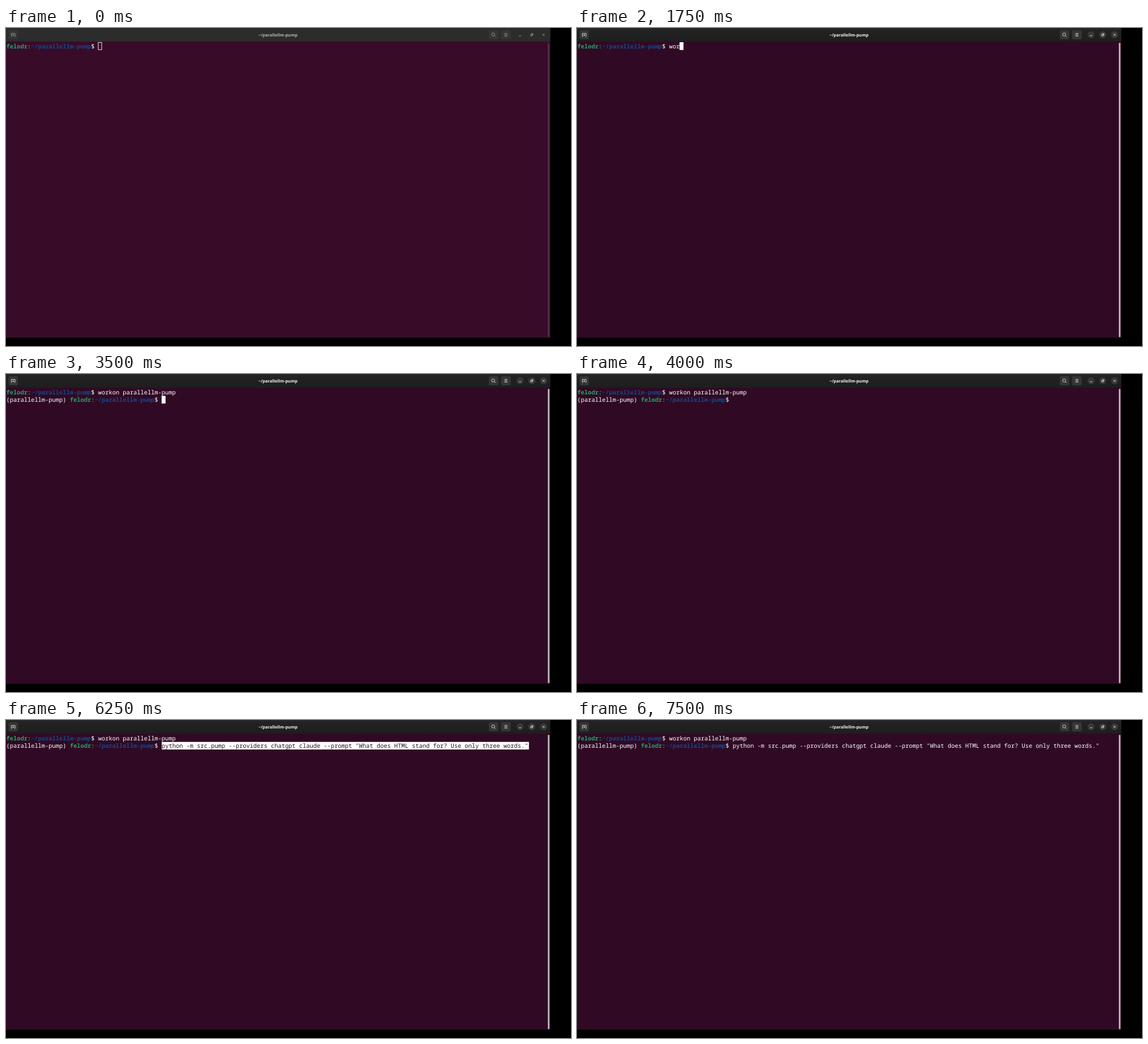
An HTML page that plays this animation: 998x561 px, repeating every 8000 ms.

```html
<!DOCTYPE html>
<html lang="en">
<head>
<meta charset="utf-8">
<title>Terminal</title>
<style>
  html, body { margin: 0; width: 100%; height: 100%; overflow: hidden; background: #000; }
  svg { display: block; width: 100vw; height: 100vh; }
  text { white-space: pre; text-rendering: geometricPrecision; }
  #term { font: 10.395px "Noto Sans Mono", monospace; }
  #title { font: bold 7.45px "Noto Sans", sans-serif; text-anchor: middle; }
</style>
</head>
<body>
<svg id="stage" viewBox="0 0 998 561" xmlns="http://www.w3.org/2000/svg">
  <defs>
    <linearGradient id="barOn" x2="0" y2="1">
      <stop stop-color="#282828"/><stop offset=".2" stop-color="#222"/><stop offset="1" stop-color="#1e1e1e"/>
    </linearGradient>
  </defs>
  <rect width="998" height="561"/>
  <rect id="bg" y="24" width="961.5" height="522.5"/>
  <rect id="bar" width="961.5" height="24"/>
  <g id="buttons">
    <rect x="4.5" y="4" width="16.5" height="16" rx="2.5"/>
    <rect x="853" y="4" width="16.5" height="16" rx="2.5"/>
    <rect x="874.5" y="4" width="17" height="16" rx="2.5"/>
  </g>
  <g id="discs" fill="#383838">
    <circle cx="908" cy="12" r="6.2"/><circle cx="928.7" cy="12" r="6.2"/><circle cx="949.6" cy="12" r="6.2"/>
  </g>
  <g id="icons" fill="none" stroke-width=".9">
    <path d="M10.6 15H9.5V9.5H16V15H14.9M12.75 11V14.2M11.2 12.6H14.3"/>
    <circle cx="860.5" cy="11.4" r="2.7"/><path d="M862.5 13.4L864.6 15.5"/>
    <path d="M880.4 9.7H885.6M880.4 12H885.6M880.4 14.3H885.6"/>
    <path d="M906 13.7H910"/>
    <path d="M926.8 11.2H929.6V14H926.8ZM928 9.9H930.8V12.7"/>
    <path d="M947.8 10.2L951.4 13.8M951.4 10.2L947.8 13.8"/>
  </g>
  <text id="title" x="480.5" y="14.6">~/parallellm-pump</text>
  <rect id="scroll" x="957" y="26" width="3" height="519.5" rx="1.5"/>
  <g id="term">
    <g id="lines"></g>
    <rect id="cursor" stroke="#fff" stroke-width=".9"/>
  </g>
</svg>
<script>
const LOOP = 8000, STEP = 250;
const CELL = 6.237, LEFT = 0.6, ROW = 13.45, TOP = 25.2;
const WHITE = '#fff', GREEN = '#26a269', BLUE = '#12488b', PLUM = '#300a24';
const USER = 'felodr', PROJECT = 'parallellm-pump';
const TYPED = 'workon para', ACTIVATE = 'workon ' + PROJECT;
const COMMAND = 'python -m src.pump --providers chatgpt claude --prompt ' +
  '"What does HTML stand for? Use only three words."';

// Event times in ms
const FOCUS = 750, TYPE = 1500, COMPLETE = 3000, READY = 3250, PASTE = 4500, RUN = 6750;
const BLINK_OFF = [[4000, 4500], [5000, 5750], [6250, 6750], [7500, 8000]];

const $ = id => document.getElementById(id);
const set = (id, attrs) => {
  for (const key in attrs) $(id).setAttribute(key, attrs[key]);
};
const colX = col => LEFT + col * CELL;
const rowY = row => TOP + row * ROW;

function span(str, col, row, fill, bold) {
  const weight = bold ? ' font-weight="700"' : '';
  return `<text x="${colX(col)}" y="${rowY(row) + 10.3}" fill="${fill}"${weight}>${str}</text>`;
}

function prompt(col, row) {
  const path = '~/' + PROJECT, pathCol = col + USER.length + 1;
  return span(USER + ':', col, row, GREEN, true) +
    span(path, pathCol, row, BLUE, true) +
    span('$', pathCol + path.length, row, WHITE);
}

const PROMPT_LEN = USER.length + PROJECT.length + 5;
const ENV = `(${PROJECT})`;
const CMD_COL = ENV.length + 1 + PROMPT_LEN;

function typedText(t) {
  if (t >= COMPLETE) return ACTIVATE;
  if (t < TYPE) return '';
  return TYPED.slice(0, 1 + 2 * (t - TYPE) / STEP);
}

function drawWindow(active) {
  set('bg', { fill: active ? PLUM : '#380c29' });
  set('bar', { fill: active ? 'url(#barOn)' : '#2c2c2c' });
  set('buttons', { fill: active ? '#363636' : '#353535' });
  set('discs', { visibility: active ? 'visible' : 'hidden' });
  set('icons', { stroke: active ? '#e8e8e8' : '#a0a0a0' });
  set('title', { fill: active ? '#f2f2f2' : '#b4b4b4' });
  set('scroll', { fill: active ? '#b5adb2' : '#532b47' });
}

function drawTerminal(t, active) {
  const typed = typedText(t);
  let out = prompt(0, 0) + span(typed, PROMPT_LEN, 0, WHITE);
  let col = PROMPT_LEN + typed.length, row = 0;

  if (t >= READY) {
    out += span(ENV, 0, 1, WHITE) + prompt(ENV.length + 1, 1);
    col = CMD_COL;
    row = 1;
  }
  if (t >= PASTE) {
    const selected = t < RUN;
    if (selected) {
      out += `<rect x="${colX(CMD_COL)}" y="${rowY(1)}" width="${COMMAND.length * CELL}" height="13.4" fill="#fff"/>`;
    }
    out += span(COMMAND, CMD_COL, 1, selected ? PLUM : WHITE);
    col += COMMAND.length;
  }
  if (t >= RUN) {
    col = 0;
    row = 2;
  }
  $('lines').innerHTML = out;

  const hidden = BLINK_OFF.some(([from, to]) => t >= from && t < to);
  set('cursor', {
    x: colX(col) + 0.2, y: rowY(row) + 0.3, width: CELL - 0.2, height: ROW - 0.7,
    fill: active ? WHITE : 'none',
    visibility: hidden ? 'hidden' : 'visible'
  });
}

function render(t) {
  const active = t >= FOCUS;
  drawWindow(active);
  drawTerminal(t, active);
}

let last = -1;
const start = performance.now();
function tick() {
  const time = (performance.now() - start) % LOOP;
  const t = Math.floor(time / STEP) * STEP;
  if (t !== last) render(last = t);
  requestAnimationFrame(tick);
}
tick();
</script>
</body>
</html>
```
